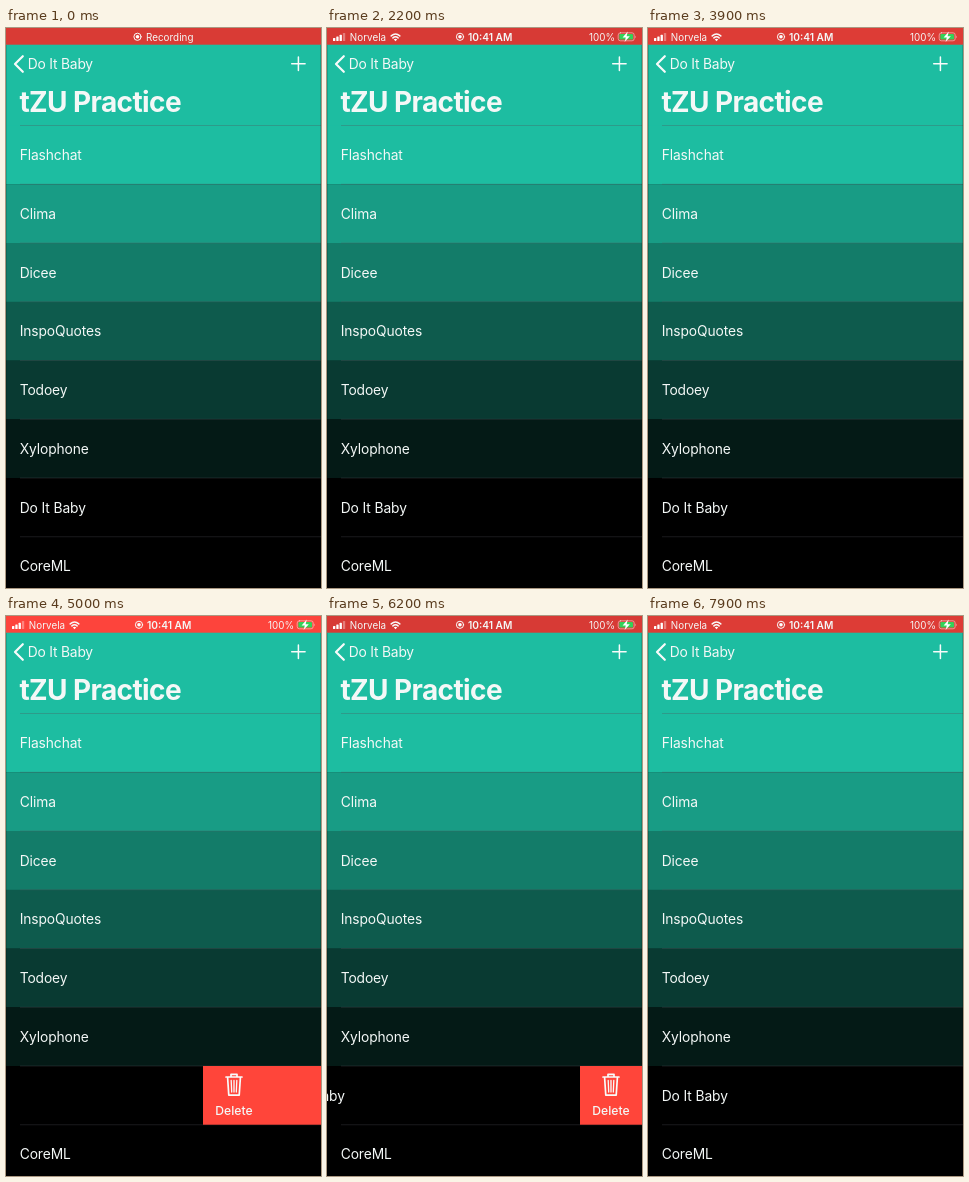
Animation, 315 px wide and 560 px high, one loop 8 s. Source, as an HTML page:

```html
<!DOCTYPE html>
<html lang="en">
<head>
<meta charset="utf-8">
<title>Project list</title>
<style>
html, body { margin: 0; width: 100%; height: 100%; overflow: hidden; background: #000; }
svg { display: block; width: 315px; height: 560px; }
text { font-family: Inter, Roboto, sans-serif; fill: #f4f8f7; white-space: pre; }
.label { font-size: 13.8px; letter-spacing: -.1px; }
.title { font-size: 28px; font-weight: 700; letter-spacing: -.6px; }
.small { font-size: 9.8px; letter-spacing: .05px; }
.clock { font-size: 10.2px; font-weight: 600; }
.action { font-size: 12.2px; font-weight: 500; }
.line { fill: none; stroke: #f8fbfa; stroke-linecap: round; stroke-linejoin: round; }
</style>
</head>
<body>
<svg viewBox="0 0 315 560">
  <defs>
    <g id="dot">
      <circle r="3.6" class="line" stroke-width="1"/>
      <circle r="1.8" fill="#fff"/>
    </g>
  </defs>
  <rect width="315" height="560"/>
  <rect y="16" width="315" height="82" fill="#1dbda1"/>
  <g id="rows"></g>

  <rect id="bar" width="315" height="16.7"/>
  <g id="recording">
    <use href="#dot" x="131.5" y="8.8"/>
    <text class="small" x="140" y="12.5">Recording</text>
  </g>
  <g id="status">
    <g fill="#fff">
      <rect x="6" y="10" width="2.3" height="3" rx=".5"/>
      <rect x="9.3" y="8.5" width="2.3" height="4.5" rx=".5"/>
      <rect x="12.6" y="6.8" width="2.3" height="6.2" rx=".5"/>
      <rect x="15.9" y="5" width="2.3" height="8" rx=".5" opacity=".35"/>
    </g>
    <text class="small" x="22.8" y="12.6">Norvela</text>
    <path class="line" stroke-width="1.5" d="M64.2 7.9Q68.5 4.1 72.8 7.9M65.9 9.9Q68.5 7.5 71.1 9.9"/>
    <path d="M66.8 11.4Q68.5 10 70.2 11.4L68.5 13.2Z" fill="#fff"/>
    <use href="#dot" x="133" y="8.8"/>
    <text class="clock" x="141" y="12.6">10:41 AM</text>
    <text class="small" x="262" y="12.6">100%</text>
    <rect x="291.2" y="4.8" width="16" height="8" rx="2.2" class="line" stroke-width=".8" opacity=".6"/>
    <rect x="292.4" y="6" width="13.6" height="5.6" rx="1.2" fill="#34d158"/>
    <path d="M308.3 7.4q1.5 1.4 0 2.8z" fill="#fff" opacity=".6"/>
    <path d="M300.8 3.6L295.6 9.4H298.8L297.6 14L302.8 8.2H299.6Z" fill="#fff"/>
  </g>

  <path class="line" stroke-width="2.2" d="M16.8 28.2L9 36L16.8 43.8"/>
  <text class="label" x="21.8" y="40.8" style="letter-spacing:-.2px">Do It Baby</text>
  <path class="line" stroke-width="1.5" d="M285.7 35.8H299.1M292.4 29.1V42.5"/>
  <text class="title" x="13.4" y="84">tZU Practice</text>

  <g id="delete">
    <rect y="450" width="315" height="58.7" fill="#ff453a"/>
    <g class="line" stroke-width="1.7">
      <path d="M23 461H39M28 460.5V458.3H34V460.5M24.6 461.5L25.8 479.2H36.2L37.4 461.5"/>
      <path stroke-width="1.3" d="M28.2 464.5L28.7 476M31 464.5V476M33.8 464.5L33.3 476"/>
    </g>
    <text class="action" x="31" y="499" text-anchor="middle">Delete</text>
  </g>
  <path id="check" class="line" stroke-width="2" d="M285.7 480.8L289.6 485.6L297.3 474.4"/>
  <path d="M.5 17V450M314.5 17V450" stroke="#000" stroke-opacity=".15"/>
</svg>
<script>
const $ = id => document.getElementById(id);
const LOOP = 8000, TOP = 97.5, STEP = 58.75;
const names = ['Flashchat', 'Clima', 'Dicee', 'InspoQuotes', 'Todoey', 'Xylophone', 'Do It Baby', 'CoreML'];

// Each row is one step darker than the row above.
$('rows').innerHTML = names.map((name, i) => {
  const y = TOP + i * STEP, k = Math.max(0, 1 - i * .173);
  const fill = `rgb(${[29, 189, 161].map(c => Math.round(c * k))})`;
  return `<rect y="${y}" width="315" height="${STEP + .3}" fill="${fill}"/>
    <path d="M14 ${y}H315" stroke="#545458" stroke-opacity=".4" stroke-width=".8"/>
    <text class="label" x="13.7" y="${y + 34.7}">${name}</text>`;
}).join('');
const swiped = $('rows').querySelectorAll('text')[6];

const clamp = x => Math.min(1, Math.max(0, x));
const ease = (t, from, to) => {
  const x = clamp((t - from) / (to - from));
  return x * x * (3 - 2 * x);
};
const mix = (a, b, k) => a + (b - a) * k;

function draw(t) {
  const glow = (1 - Math.cos(2 * Math.PI * (t / 2000 - .08))) / 2;
  $('bar').setAttribute('fill', `rgb(${mix(215, 255, glow)},${mix(58, 69, glow)},${mix(53, 60, glow)})`);

  const shown = ease(t, 1900, 2200);
  $('recording').setAttribute('opacity', 1 - shown);
  $('status').setAttribute('opacity', shown);
  $('check').setAttribute('visibility', t >= 2300 && t < 3400 ? 'visible' : 'hidden');

  // Drag past the button, settle on its width, then close.
  const shift = 118 * ease(t, 4400, 5000) - 56 * ease(t, 5200, 5600) - 62 * ease(t, 6800, 7200);
  swiped.setAttribute('transform', `translate(${-shift})`);
  $('delete').setAttribute('transform', `translate(${315 - shift})`);
}

const start = performance.now();
function tick() {
  draw((performance.now() - start) % LOOP);
  requestAnimationFrame(tick);
}
tick();
</script>
</body>
</html>
```
